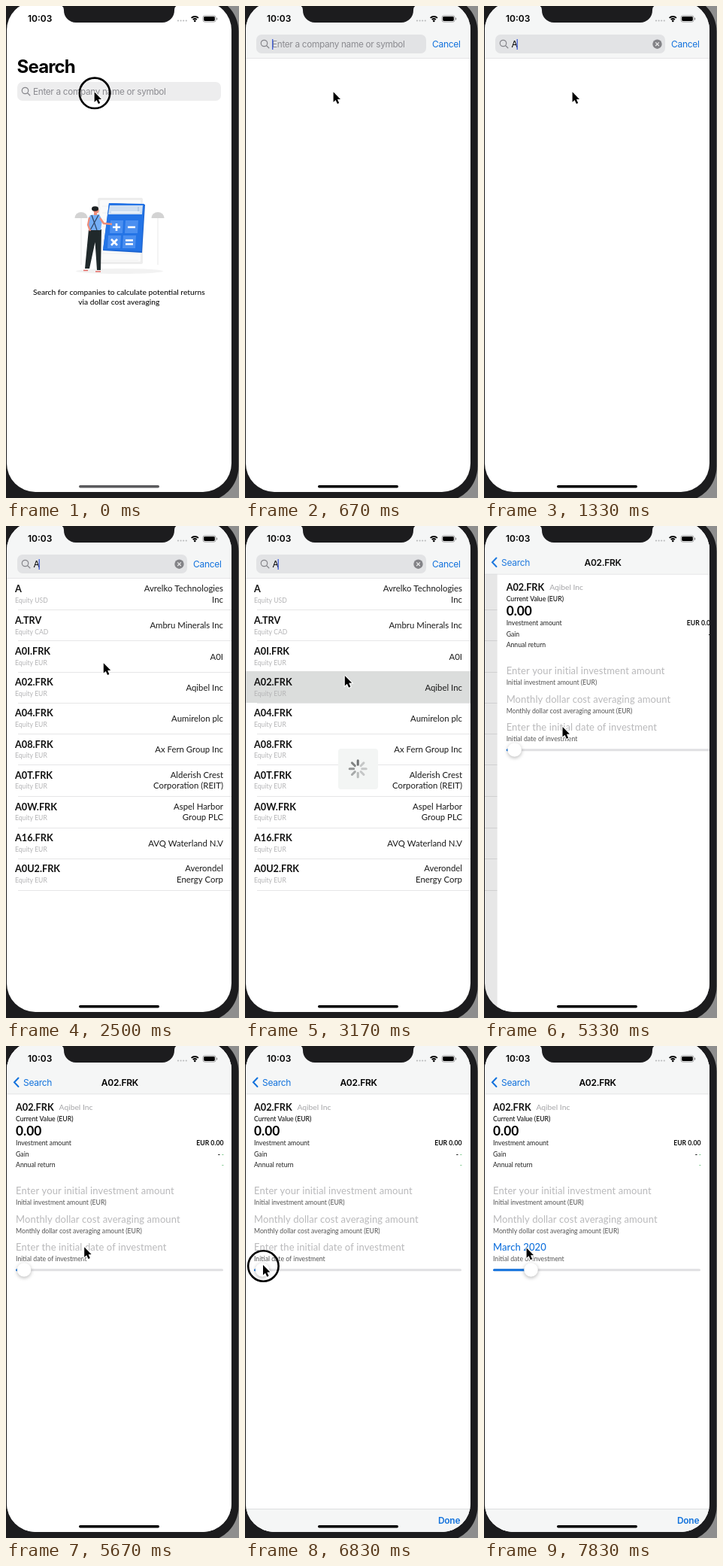
Recreate the animation shown at these times as an HTML page with a canvas. Size 310 by 654 pixels, loop 8000 ms.

```html
<!DOCTYPE html>
<html lang="en">
<head>
<meta charset="utf-8">
<title>Stock search</title>
<style>
  html, body { margin: 0; width: 100%; height: 100%; overflow: hidden; background: #8e8e8e; }
  canvas { display: block; width: 310px; height: 654px; }
</style>
</head>
<body>
<canvas></canvas>
<script>
const canvas = document.querySelector('canvas');
const c = canvas.getContext('2d');
const scale = window.devicePixelRatio || 1;
canvas.width = 310 * scale;
canvas.height = 654 * scale;

const LOOP = 8000, STEPS_PER_SECOND = 6;
const BLUE = '#1272dd', BAR = '#f5f6f6', HAIRLINE = '#dcdcde';
const UI = 'Inter, sans-serif', BODY = 'Lato, sans-serif';

const ROWS = [
  ['A', 'USD', 'Avrelko Technologies', 'Inc'],
  ['A.TRV', 'CAD', 'Ambru Minerals Inc'],
  ['A0I.FRK', 'EUR', 'A0I'],
  ['A02.FRK', 'EUR', 'Aqibel Inc'],
  ['A04.FRK', 'EUR', 'Aumirelon plc'],
  ['A08.FRK', 'EUR', 'Ax Fern Group Inc'],
  ['A0T.FRK', 'EUR', 'Alderish Crest', 'Corporation (REIT)'],
  ['A0W.FRK', 'EUR', 'Aspel Harbor', 'Group PLC'],
  ['A16.FRK', 'EUR', 'AVQ Waterland N.V'],
  ['A0U2.FRK', 'EUR', 'Averondel', 'Energy Corp']
];
const PICKED = 3;
const MONTHS = ['January', 'February', 'March', 'April', 'May', 'June', 'July',
  'August', 'September', 'October', 'November', 'December'];

// Pointer tip: seconds, x, y
const POINTER = [
  [0, 117.6, 114.3], [2, 117.6, 114.3], [2.7, 132.8, 199], [3.3, 132.8, 199], [4.3, 107.2, 264.3],
  [5.6, 104.2, 267.3], [6, 104.2, 267.3], [6.6, 24, 291], [6.9, 24, 291], [7.5, 62, 291], [7.8, 56.6, 268.4]
];
const PRESSES = [[0, 0.3], [2.8, 3.1], [6.6, 7.6]];

const clamp = v => Math.max(0, Math.min(1, v));
const smooth = v => { v = clamp(v); return v * v * (3 - 2 * v); };
const between = (t, a, b) => t >= a && t < b;

function text(str, x, y, size, color = '#111', { weight = 400, family = BODY, align = 'left', spacing = 0 } = {}) {
  c.font = `${weight} ${size}px ${family}`;
  c.letterSpacing = spacing + 'px';
  c.textAlign = align;
  c.fillStyle = color;
  c.fillText(str, x, y);
}
const ui = (str, x, y, color, options) =>
  text(str, x, y, 12, color, { family: UI, spacing: -0.3, ...options });

function rect(x, y, w, h, color, radius = 0) {
  c.fillStyle = color;
  c.beginPath();
  c.roundRect(x, y, w, h, radius);
  c.fill();
}
function disc(x, y, rx, color, ry = rx) {
  c.fillStyle = color;
  c.beginPath();
  c.ellipse(x, y, rx, ry, 0, 0, 7);
  c.fill();
}
function poly(points, color) {
  c.fillStyle = color;
  c.beginPath();
  points.forEach(([x, y]) => c.lineTo(x, y));
  c.closePath();
  c.fill();
}
function line(points, color, width = 1, cap = 'butt') {
  c.strokeStyle = color;
  c.lineWidth = width;
  c.lineCap = cap;
  c.beginPath();
  points.forEach(([x, y]) => c.lineTo(x, y));
  c.stroke();
}
function group(alpha, dx, dy, draw) {
  if (alpha <= 0) return;
  c.save();
  c.globalAlpha *= alpha;
  c.translate(dx, dy);
  draw();
  c.restore();
}

function drawIllustration() {
  disc(151, 352.5, 58, '#f2f2f2', 3.5);
  for (const x of [100, 202]) {
    line([[x, 280], [x, 344]], '#e9e9e9', 1);
    c.fillStyle = '#d3d3d3';
    c.beginPath();
    c.ellipse(x, 282, 8.5, 8, 0, Math.PI, 0);
    c.fill();
  }
  rect(122, 255, 60, 88, '#ededed', 2);
  rect(125, 258, 54, 82, '#fafafa', 1);
  for (let y = 266; y < 340; y += 9) line([[128, y], [176, y]], '#efefef');

  poly([[137, 262], [185, 264], [181, 328], [129, 325]], '#1a62cf');
  poly([[137, 262], [184, 263], [180, 326], [129, 324]], '#2474e6');
  poly([[138, 265], [182, 265], [181, 277], [136, 277]], '#cfdff1');
  line([[140, 274], [178, 274]], '#edf4fb', 2);
  line([[176, 267], [176, 273]], '#9db9d9', 1);
  [['+', 147, 294], ['-', 167, 294], ['x', 144, 314], ['=', 164, 314]].forEach(([sign, x, y]) => {
    poly([[x - 8, y - 9], [x + 9, y - 9], [x + 8, y + 8], [x - 9, y + 8]], '#4b8ff0');
    const bar = (x1, y1, x2, y2) => line([[x + x1, y + y1], [x + x2, y + y2]], '#fff', 2.6);
    if (sign === '+') { bar(-5, 0, 5, 0); bar(0, -5, 0, 5); }
    if (sign === '-') bar(-5, 0, 5, 0);
    if (sign === 'x') { bar(-4, -4, 4, 4); bar(-4, 4, 4, -4); }
    if (sign === '=') { bar(-5, -2.5, 5, -2.5); bar(-5, 2.5, 5, 2.5); }
  });

  poly([[110, 297], [127, 297], [126, 351], [121, 351], [118.5, 314], [111, 349], [105, 349]], '#20292b');
  line([[103, 351.5], [109, 351.5]], '#e56a63', 1.6);
  line([[119, 353], [126, 353]], '#e56a63', 1.6);
  poly([[112, 278], [124, 277], [128, 285], [126, 298], [110, 298], [109, 285]], '#74aef5');
  line([[114, 278], [121, 298]], '#2c4160', 1.2);
  line([[123, 278], [112, 298]], '#2c4160', 1.2);
  line([[111, 281], [109, 291], [112, 299]], '#ef8d79', 2.2);
  line([[125, 282], [130, 289], [141, 290]], '#ef8d79', 2.6);
  rect(117, 273, 4, 5, '#ef8d79');
  disc(120, 272, 3.6, '#ef8d79');
  disc(118.5, 269.5, 4.5, '#1c2022', 3.2);
}

function drawOnboarding() {
  drawIllustration();
  const caption = { align: 'center', weight: 500 };
  text('Search for companies to calculate potential returns', 150.3, 384, 10.25, '#111', caption);
  text('via dollar cost averaging', 150.3, 397, 10.25, '#111', caption);
}

function drawResults(highlight) {
  let y = 70;
  ROWS.forEach(([symbol, currency, ...name], i) => {
    const wraps = name.length > 1;
    const height = wraps ? 41.85 : 41.1;
    const bottom = Math.floor(y + height);
    if (i === PICKED) group(highlight, 0, 0, () => rect(0, Math.floor(y) - 1, 301, 42, '#dbdddc'));
    text(symbol, 12, y + 18.3, 12.7, '#111', { weight: 700 });
    text('Equity ' + currency, 12, y + 32, 8.6, '#b4b4b6');
    name.forEach((part, n) => text(part, 289, y + (wraps ? 17.3 + n * 14.7 : 24.6), 11.4, '#1a1a1a', { align: 'right' }));
    rect(16, bottom, 285, 1, '#e6e6e7');
    y += height;
  });
}

function drawSpinner(t) {
  rect(124, 296, 53, 54, '#f3f5f4', 4);
  const lead = Math.floor((t - 3.16) * 10) + 80;
  for (let i = 0; i < 8; i++) {
    const age = (lead - i) % 8;
    c.save();
    c.translate(150.2, 322.7);
    c.rotate(i * Math.PI / 4);
    c.globalAlpha *= Math.max(0.25, 0.72 - age * 0.1);
    line([[0, -5.5], [0, -11]], '#3c3f40', 3, 'round');
    c.restore();
  }
}

function drawSearchHeader(active, t) {
  group(1 - active * 1.6, 0, -45 * active, () =>
    text('Search', 14.6, 89, 24, '#000', { weight: 700, family: UI, spacing: -0.85 }));
  const y = 101 - 63 * active, width = 271 - 45 * active;
  rect(15, y, width, 25, active > 0.5 ? '#e2e3e5' : '#ededee', 7);
  c.strokeStyle = '#85858a';
  c.lineWidth = 1.2;
  c.beginPath();
  c.arc(25.5, y + 11.5, 4.2, 0, 7);
  c.stroke();
  line([[28.6, y + 14.6], [31.8, y + 17.8]], '#85858a', 1.3, 'round');

  const typed = t >= 1;
  if (typed) {
    ui('A', 36.5, y + 17, '#000');
    disc(230.5, y + 12.7, 6.2, '#838387');
    line([[228.2, y + 10.4], [232.8, y + 15]], '#eee', 1.1);
    line([[232.8, y + 10.4], [228.2, y + 15]], '#eee', 1.1);
  } else {
    text('Enter a company name or symbol', 36, y + 16.8, 11.8, '#8b8b90', { family: UI, spacing: -0.33 });
  }
  if (between(t, 0.5, 3.6)) rect(typed ? 43.5 : 36, y + 6, 1.4, 14, '#4763d6');
  group(active, 50 * (1 - active), 0, () => ui('Cancel', 249, y + 17, BLUE));
}

function drawNavItems(shift) {
  line([[16.5, 42.5], [11, 48.3], [16.5, 54]], BLUE, 2, 'round');
  ui('Search', 23, 52.5, BLUE);
  ui('A02.FRK', 151 + shift, 52.5, '#000', { weight: 600, align: 'center' });
}

function drawDetail(thumb) {
  const bold = { weight: 700 }, right = { align: 'right' };
  text('A02.FRK', 12, 85.5, 12.7, '#111', bold);
  text(ROWS[PICKED][2], 69.5, 85, 10.3, '#a5a5a8');
  text('Current Value (EUR)', 12, 99.5, 8.7, '#111', { weight: 500 });
  text('0.00', 12, 119, 17.3, '#000', bold);
  text('Investment amount', 12, 132, 8.7, '#222');
  text('EUR 0.00', 288.5, 132, 8.7, '#111', { ...bold, ...right });
  text('Gain', 12, 146.5, 8.7, '#222');
  text('-', 284, 146.5, 8.7, '#111', { ...bold, ...right });
  text('-', 289, 146.5, 8.7, '#54b96b', right);
  text('Annual return', 12, 161, 8.7, '#222');
  text('-', 289, 161, 8.7, '#54b96b', right);

  const field = (placeholder, label, y, value) => {
    text(value || placeholder, 12, y, 13, value ? BLUE : '#b9b9bb', { spacing: 0.09, weight: value ? 500 : 400 });
    text(label, 12, y + 13.8, 8.7, '#555');
  };
  const monthsBack = Math.floor((thumb - 23) / 255 * 70);
  const month = 2021 * 12 - monthsBack;
  const date = thumb > 23 && `${MONTHS[month % 12]} ${Math.floor(month / 12)}`;
  field('Enter your initial investment amount', 'Initial investment amount (EUR)', 197.2);
  field('Monthly dollar cost averaging amount', 'Monthly dollar cost averaging amount (EUR)', 234.8);
  field('Enter the initial date of investment', 'Initial date of investment', 272.4, date);

  rect(12, 296.3, 276, 3, '#e0e0e2', 1.5);
  rect(12, 296.3, thumb - 12, 3, BLUE, 1.5);
  c.save();
  c.shadowColor = 'rgba(0,0,0,.28)';
  c.shadowBlur = 5 * scale;
  c.shadowOffsetY = 1.5 * scale;
  disc(thumb, 297.5, 9.3, '#fff');
  c.restore();
}

function drawStatus(home) {
  ui('10:03', 29, 21, '#000', { weight: 600, spacing: 0 });
  for (let i = 0; i < 4; i++) disc(229 + i * 3.6, 19.5, 1.1, '#b9babc');
  c.strokeStyle = '#000';
  c.lineWidth = 1.8;
  c.lineCap = 'butt';
  for (const r of [3.6, 6.6]) {
    c.beginPath();
    c.arc(251.3, 20.6, r, -2.36, -0.78);
    c.stroke();
  }
  disc(251.3, 19.9, 1.3, '#000');
  c.strokeStyle = '#8d8d8f';
  c.lineWidth = 0.8;
  c.beginPath();
  c.roundRect(262, 12.8, 17, 8.4, 2.5);
  c.stroke();
  rect(263.2, 14, 14.6, 6, '#000', 1.4);
  rect(280, 15.5, 1.2, 3, '#8d8d8f', 0.6);
  rect(97, 637, 107, 3.4, home, 1.7);
}

function drawNotch() {
  c.fillStyle = '#1c1c1e';
  c.beginPath();
  c.moveTo(72, -1);
  c.quadraticCurveTo(77, 0, 77, 5);
  c.arcTo(77, 22, 94, 22, 16);
  c.arcTo(224, 22, 224, 6, 16);
  c.lineTo(224, 5);
  c.quadraticCurveTo(224, 0, 229, -1);
  c.fill();
}

function pointerAt(t) {
  if (t >= 7.8) return POINTER.at(-1).slice(1);
  const i = Math.max(1, POINTER.findIndex(k => k[0] >= t));
  const [t0, x0, y0] = POINTER[i - 1], [t1, x1, y1] = POINTER[i];
  const p = smooth((t - t0) / (t1 - t0));
  return [x0 + (x1 - x0) * p, y0 + (y1 - y0) * p];
}

function drawPointer(t) {
  const [x, y] = pointerAt(t);
  if (PRESSES.some(([a, b]) => between(t, a, b))) {
    c.strokeStyle = '#000';
    c.lineWidth = 2.6;
    c.beginPath();
    c.arc(x + 0.4, y + 1.5, 20.2, 0, 7);
    c.stroke();
  }
  const shape = [[0, 0], [0, 13.4], [3, 10.7], [5.3, 15.8], [7.6, 14.8], [5.4, 9.8], [9.4, 9.6], [0, 0]];
  group(1, x, y, () => {
    line(shape, '#fff', 2.2);
    poly(shape, '#000');
  });
}

function draw(t) {
  c.setTransform(scale, 0, 0, scale, 0, 0);
  c.fillStyle = '#8e8e8e';
  c.fillRect(0, 0, 310, 654);
  rect(-60, -13, 369.5, 672, '#1c1c1e', 47);

  const active = smooth((t - 0.1) / 0.42);
  const offset = t < 5 ? 300 : 300 * Math.exp(-8.5 * (t - 5));
  const pushed = 1 - offset / 300;
  const toolbar = smooth((t - 5.9) / 0.35);
  const thumb = 23 + 39.5 * smooth((t - 6.9) / 0.6);

  c.save();
  c.beginPath();
  c.roundRect(1, -6, 299, 652, 38);
  c.clip();
  c.fillStyle = '#fff';
  c.fillRect(0, 0, 310, 654);

  if (pushed < 0.99) group(1, -90 * pushed, 0, () => {
    if (t < 0.16) drawOnboarding();
    if (t >= 2.1) drawResults(t < 2.95 ? 0 : 1 - smooth((t - 3.25) / 0.3));
  });
  if (between(t, 1.8, 2.1) || between(t, 2.95, 4.95)) drawSpinner(t);
  if (pushed > 0) {
    group(0.1 * pushed, 0, 0, () => rect(0, 0, 301, 654, '#000'));
    group(1, offset, 0, () => {
      rect(-offset * (pushed > 0.99), 0, 310, 654, '#fff');
      drawDetail(thumb);
    });
  }

  const barHeight = 69 - 5.5 * pushed;
  group(active, 0, 0, () => {
    rect(0, 0, 301, barHeight, BAR);
    rect(0, barHeight, 301, 0.8, HAIRLINE);
  });
  group(1 - pushed * 1.4, -90 * pushed, 0, () => drawSearchHeader(active, t));
  group(pushed, 0, 0, () => drawNavItems(offset * 0.4));

  group(toolbar > 0 ? 1 : 0, 0, 39 * (1 - toolbar), () => {
    rect(0, 615, 301, 40, BAR);
    rect(0, 615, 301, 0.8, '#d6d7d8');
    ui('Done', 257, 635, BLUE, { weight: 600 });
  });
  drawStatus(active > 0 ? '#000' : '#5b5b5d');
  c.restore();
  drawNotch();
  drawPointer(t);
}

function frame(now) {
  const seconds = (now % LOOP) / 1000;
  draw(Math.floor(seconds * STEPS_PER_SECOND + 0.05) / STEPS_PER_SECOND);
  requestAnimationFrame(frame);
}
requestAnimationFrame(frame);
</script>
</body>
</html>
```
